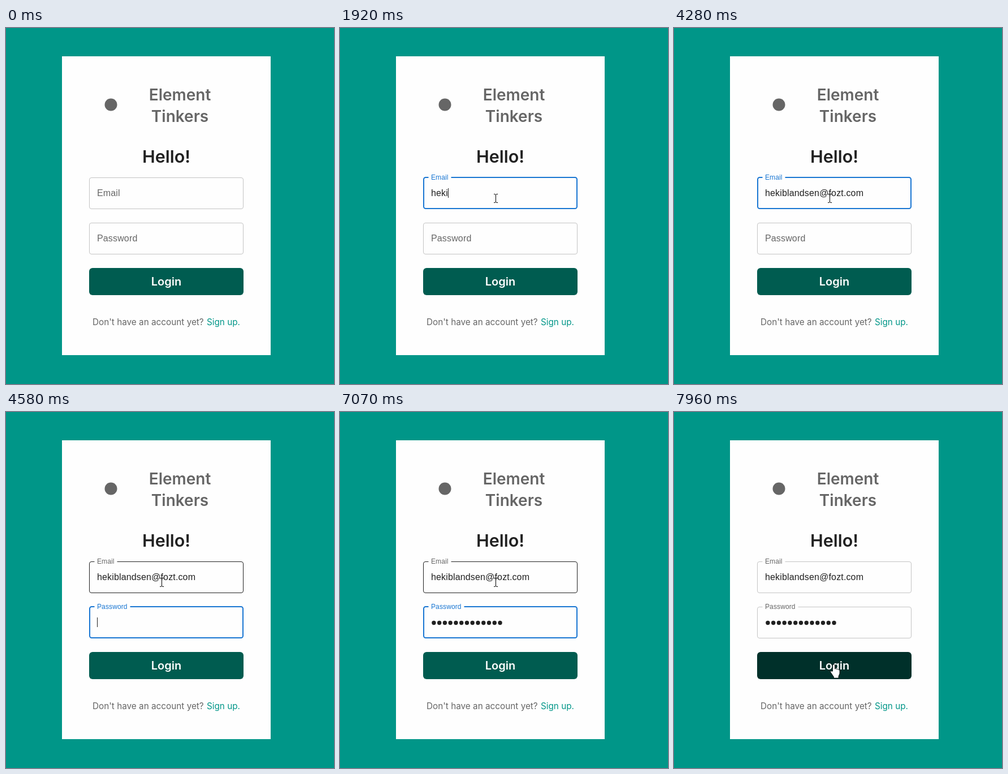
Write an HTML page that moves like this. It is 580 px wide and 629 px high and loops after 8000 ms.

```html
<!DOCTYPE html>
<html lang="en">
<head>
<meta charset="utf-8">
<title>Login form</title>
<style>
  html, body { margin: 0; width: 100%; height: 100%; overflow: hidden; background: #009688; }
  svg { display: block; }
  text { white-space: pre; }
  .brand { font-family: Inter, sans-serif; font-weight: 600; text-anchor: middle; }
  .note { font: 15.3px Inter, sans-serif; }
  .field { font-family: "Liberation Sans", Arial, sans-serif; font-size: 16px; letter-spacing: .15px; }
</style>
</head>
<body>
<svg width="580" height="629" viewBox="0 0 580 629">
  <rect width="580" height="629" fill="#009688"/>
  <rect x="99" y="50" width="369" height="528" fill="#fefefe"/>
  <circle cx="185.5" cy="135.5" r="11" fill="#666"/>
  <g class="brand" font-size="28" fill="#666">
    <text x="307.5" y="127.5">Element</text>
    <text x="307.5" y="165.5">Tinkers</text>
  </g>
  <text class="brand" x="283.5" y="238" font-size="30.5" fill="#212121">Hello!</text>

  <g id="email"></g>
  <g id="password"></g>
  <text id="typed" class="field" x="161" y="297" fill="#212121"></text>
  <g id="dots" fill="#212121"></g>
  <rect id="caret" width="1" height="17" fill="#212121"/>

  <rect id="button" x="147" y="424" width="273" height="48" rx="6"/>
  <text class="brand" x="283.5" y="455" font-size="20" fill="#fff">Login</text>
  <text class="note" x="153" y="525" fill="#666">Don't have an account yet?</text>
  <text class="note" x="414" y="525" fill="#009688" text-anchor="end">Sign up.</text>

  <g id="cursor" stroke-linejoin="round">
    <path id="arrow" d="M.5.5V16.5l3.7-3.5 2.6 5.8 2.3-1-2.5-5.8h5z" fill="#fff" stroke="#000"/>
    <path id="beam" d="M-3-7.5h2L.5-6.5 2-7.5h2M.5-6.5V6.5M-3 7.5h2L.5 6.5 2 7.5h2" fill="none" stroke="#000"/>
    <path id="hand" d="M-2.500 12V2a2 2 0 0 1 4 0v6q1.500-1 3 .3 2-.5 3 .8 2.500 0 2.500 2v5l-2 5v3h-8.500v-2l-6-9q.5-2.500 2.500-1z"
      fill="#fff" stroke="#000" stroke-width=".8"/>
  </g>
</svg>
<script>
const LOOP = 8000, FOCUS = 1190, TAB = 4380, CLICK = 7840, HOVER = 7620;
const BLUE = '#1976d2', GREY = '#666', DARK = '#212121', LINE = '#c4c4c4';
const DOT_STEP = 9.76;
const address = 'hekiblandsen@fozt.com';
const keyTimes = [1680, 1740, 1860, 1920, 2040, 2100, 2220, 2400, 2600, 2960, 3080,
  3200, 3320, 3560, 3740, 3800, 3860, 3920, 4100, 4160, 4220];
const dotTimes = [5630, 5750, 5810, 5930, 5990, 6110, 6170, 6290, 6470, 6530, 6650, 6710, 6830];
const caretOff = [[2720, 2960], [4280, TAB], [4960, 5480], [7070, 7570]];
// time, x, y
const path = [[560, 568, 474], [680, 455, 402], [800, 352, 342], [920, 294, 311], [1100, 277, 302],
  [1310, 275, 301], [7320, 275, 301], [7500, 277, 346], [7620, 280, 428], [7740, 282, 445], [7920, 283, 446]];

const $ = id => document.getElementById(id);
const set = (el, attrs) => Object.entries(attrs).forEach(([k, v]) => el.setAttribute(k, v));
const clamp = v => Math.max(0, Math.min(1, v));
const easeOut = v => 1 - (1 - clamp(v)) ** 3;
const count = (times, t) => times.filter(s => s <= t).length;
const show = (el, on) => el.style.display = on ? '' : 'none';

function makeField(id, label, top, notch) {
  $(id).innerHTML = `<rect fill="none"/><rect x="156.5" y="${top - 2}" height="4" fill="#fefefe"/>
    <text class="field">${label}</text>`;
  const [box, gap, text] = $(id).children;
  return (lift, focused, hovered) => {
    const w = focused ? 2 : 1, o = w / 2;
    const y = focused ? top : top + .5;
    set(box, { x: 147 + o, y, width: 273 - w, height: top + 56 - o - y, rx: 3.5,
      'stroke-width': w, stroke: focused ? BLUE : hovered ? DARK : LINE });
    set(gap, { width: notch * lift });
    set(text, { fill: focused ? BLUE : GREY,
      transform: `translate(161 ${top + 33 - 29 * lift}) scale(${1 - .25 * lift})` });
  };
}

const drawEmail = makeField('email', 'Email', 264, 40);
const drawPassword = makeField('password', 'Password', 344, 63);
$('dots').innerHTML = dotTimes.map((_, i) => `<circle cx="${165.9 + DOT_STEP * i}" cy="372.5" r="3.7"/>`).join('');

function pointAt(t) {
  const i = path.findIndex(p => p[0] > t);
  if (i < 1) return (i ? path.at(-1) : path[0]).slice(1);
  const [a, b] = [path[i - 1], path[i]];
  const k = (t - a[0]) / (b[0] - a[0]);
  return [1, 2].map(j => Math.round(a[j] + (b[j] - a[j]) * k));
}

function render(t) {
  // the pointer is sampled every 60 ms
  const base = t < 1400 ? 560 : 7380;
  const [x, y] = pointAt(base + Math.floor((t - base) / 60) * 60);
  const overEmail = t >= 980 && y >= 264 && y < 320;
  const overPassword = t > 7000 && y >= 344 && y < 400;
  const overButton = t >= HOVER;
  const inEmail = t >= FOCUS && t < TAB, inPassword = t >= TAB && t < CLICK;

  drawEmail(easeOut((t - FOCUS) / 200), inEmail, overEmail);
  drawPassword(easeOut((t - TAB) / 200), inPassword, overPassword);

  $('typed').textContent = address.slice(0, count(keyTimes, t));
  const dots = count(dotTimes, t);
  [...$('dots').children].forEach((dot, i) => show(dot, i < dots));

  show($('caret'), (inEmail || inPassword) && !caretOff.some(([a, b]) => t >= a && t < b));
  const width = inEmail ? $('typed').getComputedTextLength() : dots * DOT_STEP;
  set($('caret'), { x: Math.floor(161.1 + width), y: inEmail ? 283 : 363 });

  const h = clamp((t - HOVER) / 250);
  set($('button'), { fill: `rgb(0 ${Math.round(92 - 44 * h)} ${Math.round(80 - 38 * h)})` });

  show($('cursor'), t >= 560);
  set($('cursor'), { transform: `translate(${x} ${y})` });
  const beam = overEmail || overPassword;
  show($('beam'), beam);
  show($('hand'), overButton);
  show($('arrow'), !beam && !overButton);
}

const start = performance.now();
(function tick() {
  render((performance.now() - start) % LOOP);
  requestAnimationFrame(tick);
})();
</script>
</body>
</html>
```
